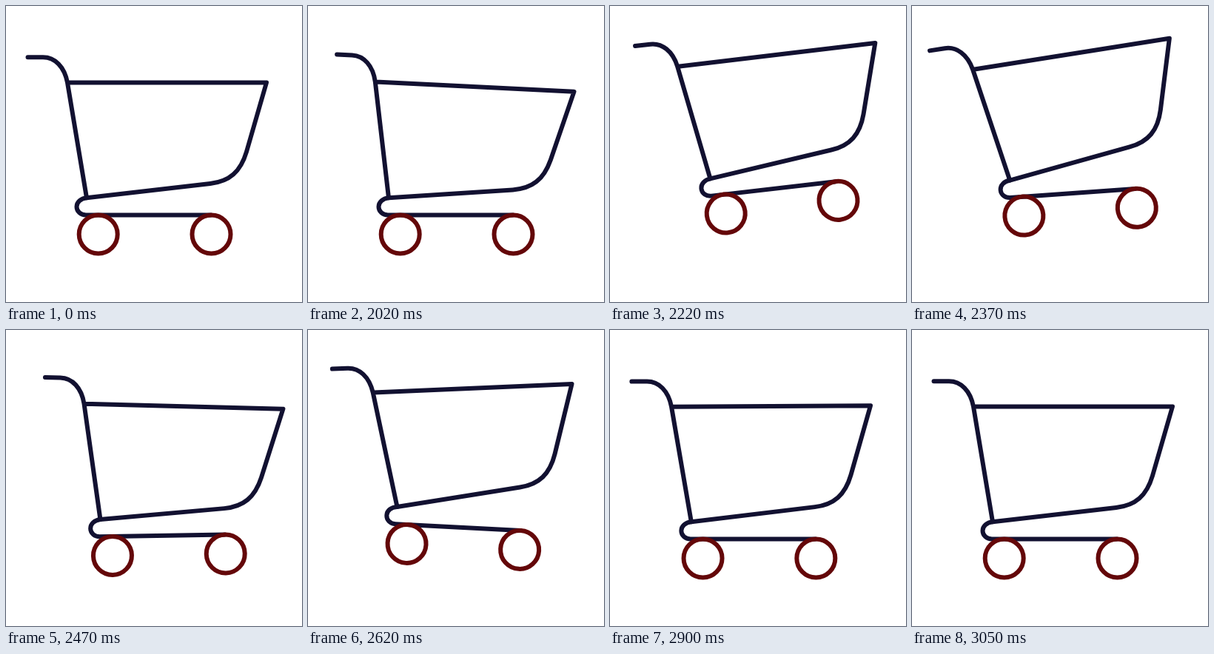
Animation, 400 px wide and 400 px high, one loop 3070 ms. Source, as an HTML page:

```html
<!DOCTYPE html>
<html lang="en">
<head>
<meta charset="utf-8">
<title>Hopping cart</title>
<style>
  html, body { margin: 0; height: 100%; overflow: hidden; background: #fff; }
  svg { display: block; width: 100%; height: 100%; }
</style>
</head>
<body>
<svg viewBox="0 0 400 400" fill="none" stroke="#121131" stroke-width="6" stroke-linecap="round" stroke-linejoin="round">
  <g id="cart">
    <path d="M109 259.2C101 260 95.5 265 95.5 271.3C95.5 277.8 101 282.5 108 282.5H277"/>
    <path id="basket" d="M29.5 69.2H50C66 69.2 79 82 83 103.5L109 259.2L276 240C302 237 317 224 325 197L352 103.5H84"/>
    <g stroke="#640709">
      <circle cx="124.7" cy="308.4" r="26"/>
      <circle cx="277.5" cy="308.4" r="26"/>
    </g>
  </g>
</svg>
<script>
const LOOP = 3070, START = 2020, LAST = 41;
const cart = document.getElementById('cart');
const basket = document.getElementById('basket');

// Keys are [step, value]; one step is 25 ms.
const shiftX = [[1, 0], [8, 31.5], [9, 32], [18, 19.25], [24, 8.75], [30, 4], [38, 0]];
const shiftY = [[2, 0], [8, -36.75], [11, -42], [18, -4.75], [19.5, 0], [21, 0],
  [24, -15.5], [26, -17.5], [30, -3.5], [31.5, 0]];
const baseTilt = [[2, 0], [8, -6.6], [9, -6.8], [18, -0.94], [20, 0], [21, 0],
  [24, 3], [25, 3.1], [30, 0]];
const basketTilt = [[-1, 0], [0, 2.87], [2, 6], [8, -6.8], [11.5, -12.2], [18, 1.49],
  [20, 6.3], [24, -2.47], [26.5, -4], [30, 1.49], [32, 3.5], [36, -1], [40, 0]];

const slope = (a, b) => (b[1] - a[1]) / (b[0] - a[0]);

// Flat at turning points, harmonic mean of the slopes elsewhere.
function tangent(keys, i) {
  if (i === 0 || i === keys.length - 1) return 0;
  const a = slope(keys[i - 1], keys[i]), b = slope(keys[i], keys[i + 1]);
  return a * b <= 0 ? 0 : 2 * a * b / (a + b);
}

function sample(keys, s) {
  const i = keys.findIndex(k => k[0] >= s);
  if (i === 0) return keys[0][1];
  if (i < 0) return keys[keys.length - 1][1];
  const [s0, v0] = keys[i - 1], [s1, v1] = keys[i];
  const d = s1 - s0, u = (s - s0) / d, w = 1 - u;
  return v0 * w * w * (1 + 2 * u) + v1 * u * u * (3 - 2 * u)
    + d * u * w * (tangent(keys, i - 1) * w - tangent(keys, i) * u);
}

// Steps last 30 and 20 ms in turn.
function stepAt(t) {
  if (t < START) return -1;
  const p = t - START;
  return 2 * Math.floor(p / 50) + (p % 50 >= 30 ? 1 : 0);
}

function draw(now) {
  const step = stepAt(now % LOOP);
  const s = step >= LAST ? -1 : step;
  const tilt = sample(baseTilt, s);
  cart.setAttribute('transform',
    `translate(${sample(shiftX, s)} ${sample(shiftY, s)}) rotate(${tilt} 201 308.4)`);
  basket.setAttribute('transform', `rotate(${sample(basketTilt, s) - tilt} 109 259.2)`);
}

const origin = performance.now();
function tick() {
  draw(performance.now() - origin);
  requestAnimationFrame(tick);
}
tick();
</script>
</body>
</html>
```
